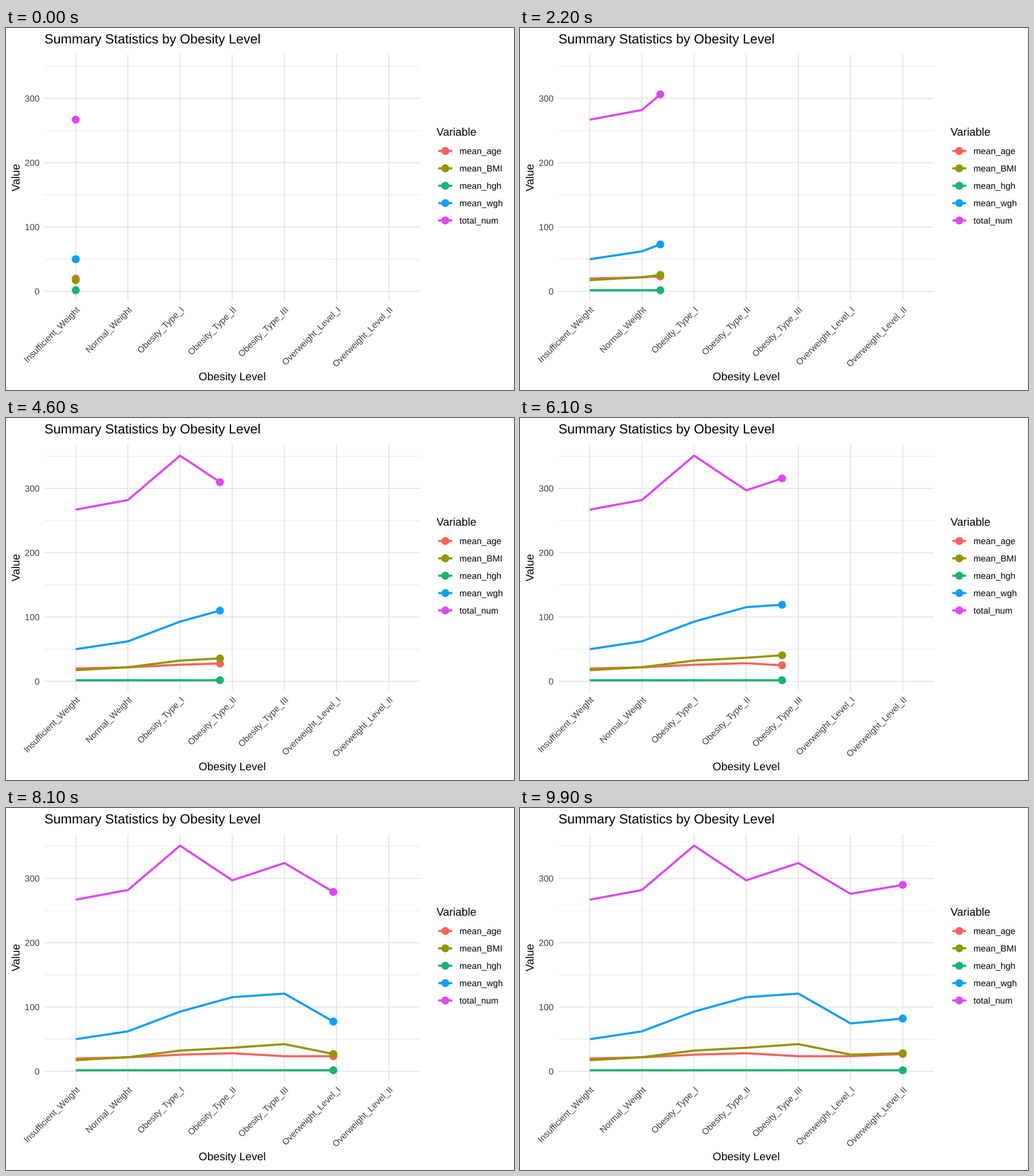
These frames come from a looping animation (885 px wide and 632 px high, 10000 ms). A matplotlib script:

```python
import numpy as np
import matplotlib.pyplot as plt
from matplotlib.animation import FuncAnimation
from matplotlib.patches import Circle, PathPatch
from matplotlib.textpath import TextPath
from matplotlib.transforms import Affine2D

W, H, DPI = 885, 632, 64
PX = 72 / DPI  # points per pixel
FRAMES, INTERVAL = 100, 100

plt.rcParams["font.family"] = "Liberation Sans"

LEVELS = ["Insufficient_Weight", "Normal_Weight", "Obesity_Type_I",
          "Obesity_Type_II", "Obesity_Type_III",
          "Overweight_Level_I", "Overweight_Level_II"]
SERIES = {
    "mean_age": ("#F8625B", [19.9, 21.8, 25.9, 28.2, 23.5, 23.6, 27.0]),
    "mean_BMI": ("#939600", [17.4, 22.0, 32.3, 36.7, 42.3, 26.0, 28.2]),
    "mean_hgh": ("#18B46E", [1.69, 1.68, 1.69, 1.77, 1.69, 1.70, 1.70]),
    "mean_wgh": ("#109FF5", [50.0, 62.2, 92.9, 115.3, 120.9, 74.5, 82.1]),
    "total_num": ("#DE48F0", [267, 282, 351, 297, 324, 276, 290]),
}
LEFT, RIGHT, TOP, BOTTOM = 67, 721.3, 46, 476.6
GRID, TICK_TEXT = "#E5E5E5", "#404040"
LINE_W, RADIUS = 3.75, 6.92
TITLE_SIZE, LABEL_SIZE, TICK_SIZE = 23.2, 19.33, 15.46

fig = plt.figure(figsize=(W / DPI, H / DPI), dpi=DPI, facecolor="white")
ax = fig.add_axes([0, 0, 1, 1])
ax.set_xlim(0, W)
ax.set_ylim(H, 0)
ax.axis("off")


def x_pos(i):
    return 121.5 + 90.88 * i


def y_pos(v):
    return 459.77 - 1.1227 * np.asarray(v, dtype=float)


def stroke(xs, ys, color, width, z):
    return ax.plot(xs, ys, color=color, lw=width * PX, zorder=z, snap=False,
                   solid_capstyle="butt", solid_joinstyle="round")[0]


def dot(x, y, color, z):
    return ax.add_patch(Circle((x, y), RADIUS, fc=color, lw=0, zorder=z,
                               snap=False))


def advance(s, size):
    """Pen width of s, side bearings included."""
    def ink_end(t):
        return TextPath((0, 0), t, size=size).get_extents().x1
    return ink_end(s + "I") - ink_end("I")


def label(x, y, s, size, color="black", align=0, angle=0):
    """Text on a baseline; align 0 is left, 0.5 centre, 1 right."""
    path = TextPath((-align * advance(s, size), 0), s, size=size)
    place = Affine2D().scale(1, -1).rotate_deg(-angle).translate(x, y)
    ax.add_patch(PathPatch(place.transform_path(path), fc=color, lw=0,
                           zorder=6, snap=False))


# Grid and axis labels
for v in (50, 150, 250, 350):
    stroke([LEFT, RIGHT], [y_pos(v)] * 2, GRID, 0.95, 1)
for v in (0, 100, 200, 300):
    stroke([LEFT, RIGHT], [y_pos(v)] * 2, GRID, 1.87, 1)
    label(58.5, y_pos(v) + 5.5, str(v), TICK_SIZE, TICK_TEXT, align=1)
for i, name in enumerate(LEVELS):
    stroke([x_pos(i)] * 2, [TOP, BOTTOM], GRID, 1.87, 1)
    label(x_pos(i) + 7.85, 493.1, name, TICK_SIZE, TICK_TEXT, align=1,
          angle=45)

label(LEFT, 27, "Summary Statistics by Obesity Level", TITLE_SIZE)
label(394.1, 615, "Obesity Level", LABEL_SIZE, align=0.5)
label(23.5, 261.3, "Value", LABEL_SIZE, align=0.5, angle=90)

# Legend
label(750, 188, "Variable", LABEL_SIZE)
for i, (name, (color, _)) in enumerate(SERIES.items()):
    y = 214.7 + 30.33 * i
    stroke([753.2, 777.4], [y, y], color, LINE_W, 2)
    dot(765.3, y, color, 3)
    label(790, y + 5.5, name, TICK_SIZE)

# Each level is reached on a whole frame
steps = np.arange(len(LEVELS))
keys = np.rint(steps * (FRAMES - 1) / (len(LEVELS) - 1))
tracks = []
for color, values in SERIES.values():
    tracks.append((y_pos(values), stroke([], [], color, LINE_W, 4),
                   dot(0, 0, color, 5)))


def update(frame):
    t = np.interp(frame, keys, steps)
    done = steps[steps < t]
    for ys, line, head in tracks:
        x, y = x_pos(t), np.interp(t, steps, ys)
        line.set_data(np.append(x_pos(done), x), np.append(ys[done], y))
        head.center = x, y
    return [artist for track in tracks for artist in track[1:]]


anim = FuncAnimation(fig, update, frames=FRAMES, interval=INTERVAL,
                     repeat=True, repeat_delay=0, blit=False)
plt.show()
```
